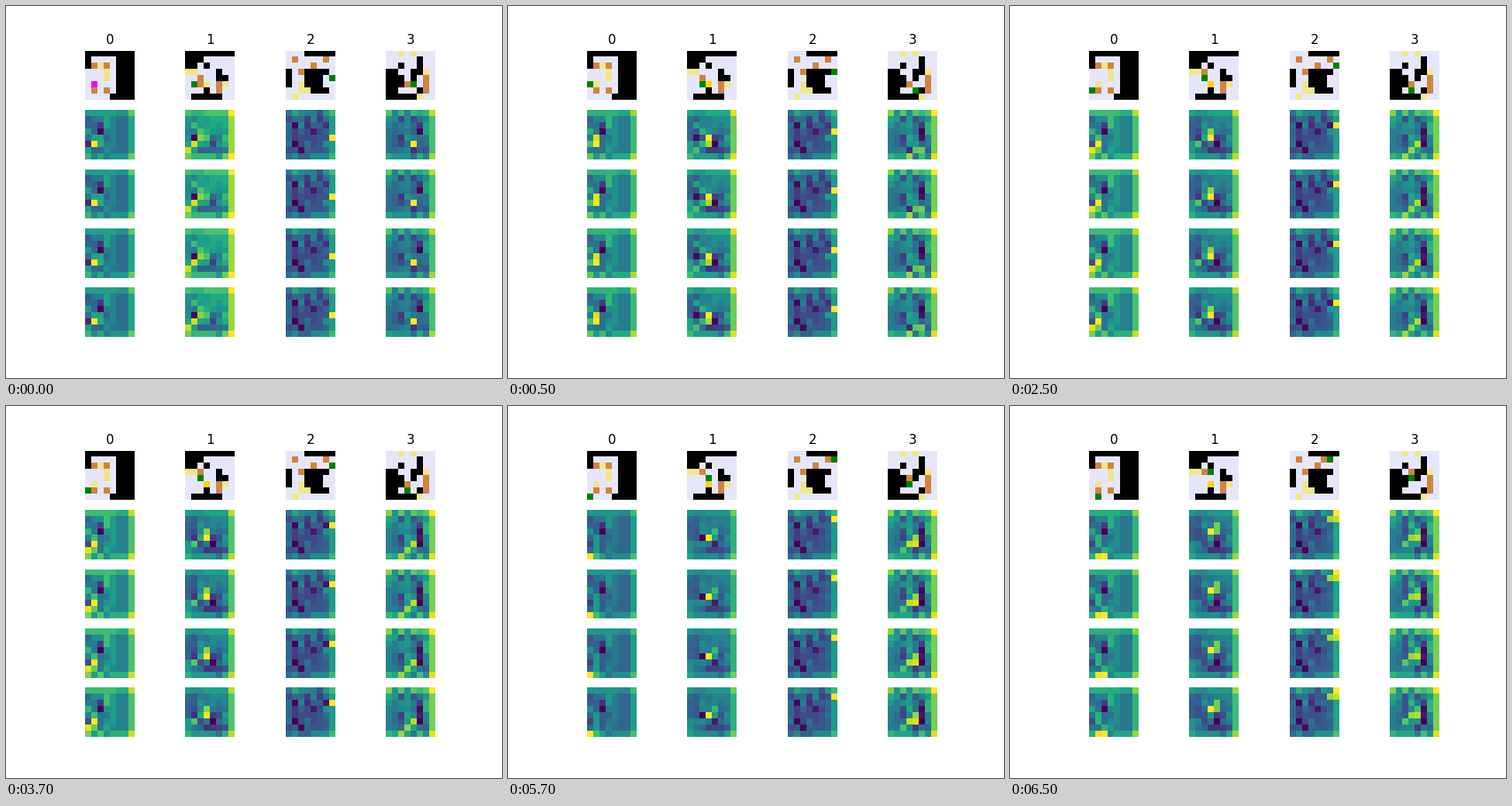
A matplotlib script for the animation above (8000 ms loop, 640 by 480 pixels).

```python
import numpy as np
import matplotlib.pyplot as plt
from matplotlib.animation import FuncAnimation
from matplotlib.colors import to_rgb

N = 8
MOVES = {"U": (-1, 0), "D": (1, 0), "L": (0, -1), "R": (0, 1)}
FLOOR, WALL, GOAL, BOX, DONE, AGENT, AGENT_ON_GOAL = (
    to_rgb(c) for c in
    ("lavender", "black", "khaki", "peru", "gold", "green", "magenta"))

# walls are (row, column, height, width) blocks
LEVELS = [
    dict(walls=[(0, 0, 1, 8), (1, 0, 2, 1), (1, 5, 6, 3), (7, 4, 1, 4)],
         goals=[(2, 2), (3, 3), (4, 3), (5, 1)],
         boxes=[(2, 1), (2, 3), (6, 1), (6, 3)],
         agent=(5, 1), path="LDDR"),
    dict(walls=[(0, 0, 1, 8), (1, 0, 1, 3), (2, 0, 1, 2), (2, 3, 1, 1),
                (3, 5, 1, 1), (4, 5, 1, 2), (6, 3, 1, 1), (7, 1, 1, 5)],
         goals=[(3, 0), (3, 1), (5, 3), (5, 6)],
         boxes=[(4, 2), (5, 2), (5, 5), (6, 5)],
         agent=(5, 1), path="RURU"),
    dict(walls=[(0, 3, 1, 5), (3, 0, 3, 1), (3, 3, 1, 4), (4, 3, 2, 3),
                (6, 4, 1, 3)],
         goals=[(5, 2), (6, 2), (6, 3), (7, 1)],
         boxes=[(1, 1), (1, 6), (2, 4), (3, 2)],
         agent=(4, 7), path="UUUL"),
    dict(walls=[(1, 5, 3, 1), (2, 2, 1, 1), (3, 0, 4, 2), (3, 4, 2, 1),
                (4, 2, 2, 1), (6, 5, 1, 1), (7, 0, 1, 5)],
         goals=[(0, 2), (0, 4), (3, 6), (7, 5)],
         boxes=[(5, 3), (4, 6), (5, 6), (6, 6)],
         agent=(5, 4), path="DLUU"),
]

# Effect of a tile on the cells around it: {(row offset, column offset): weight}
WALL_KERNEL = {(0, 0): -.04, (0, -1): -.05, (-1, 0): -.06}
OBJECT_KERNEL = {(0, -1): -.2, (-1, -1): -.2, (1, 0): -.18, (-1, 0): .1}
AGENT_KERNEL = {(0, 0): .5, (0, 1): .35, (-1, 1): .3, (1, -1): .22,
                (0, -1): -.1}


def play(level, steps):
    """Return agent and box positions after the given number of moves."""
    (r, c), boxes = level["agent"], set(level["boxes"])
    for move in level["path"][:steps]:
        dr, dc = MOVES[move]
        r, c = r + dr, c + dc
        if (r, c) in boxes:
            boxes.remove((r, c))
            boxes.add((r + dr, c + dc))
    return (r, c), boxes


def wall_mask(level):
    mask = np.zeros((N, N), bool)
    for r, c, h, w in level["walls"]:
        mask[r:r + h, c:c + w] = True
    return mask


def cell_mask(cells):
    mask = np.zeros((N, N), bool)
    for cell in cells:
        mask[cell] = True
    return mask


def convolve(mask, kernel):
    padded = np.pad(mask.astype(float), 1)
    return sum(w * padded[1 - dr:1 - dr + N, 1 - dc:1 - dc + N]
               for (dr, dc), w in kernel.items())


def board(level, step):
    agent, boxes = play(level, step)
    goals = level["goals"]
    img = np.full((N, N, 3), FLOOR)
    img[wall_mask(level)] = WALL
    for cell in goals:
        img[cell] = GOAL
    for cell in boxes:
        img[cell] = DONE if cell in goals else BOX
    img[agent] = AGENT_ON_GOAL if agent in goals else AGENT
    return img


def activation(level, step):
    """Sum the tile responses and the border, scaled to 0..1."""
    agent, boxes = play(level, step)
    heat = (convolve(wall_mask(level), WALL_KERNEL)
            + convolve(cell_mask(boxes.union(level["goals"])), OBJECT_KERNEL)
            + convolve(cell_mask([agent]), AGENT_KERNEL))
    heat[0] += .18
    heat[-1] += .14
    heat[:, 0] += .06
    heat[:, -1] += .22
    return (heat - heat.min()) / np.ptp(heat)


fig, axes = plt.subplots(5, 4, figsize=(6.4, 4.8), dpi=100)
for ax in axes.flat:
    ax.axis("off")

boards, maps = [], []
for k, level in enumerate(LEVELS):
    axes[0, k].set_title(str(k))
    boards.append(axes[0, k].imshow(board(level, 0)))
    maps.append([ax.imshow(activation(level, 0), vmin=0, vmax=1)
                 for ax in axes[1:, k]])


def update(frame):
    step = (frame + 3) // 4
    for level, picture, column in zip(LEVELS, boards, maps):
        picture.set_data(board(level, step))
        heat = activation(level, step)
        for im in column:
            im.set_data(heat)
    return boards + sum(maps, [])


anim = FuncAnimation(fig, update, frames=16, interval=500, repeat=True)
plt.show()
```
